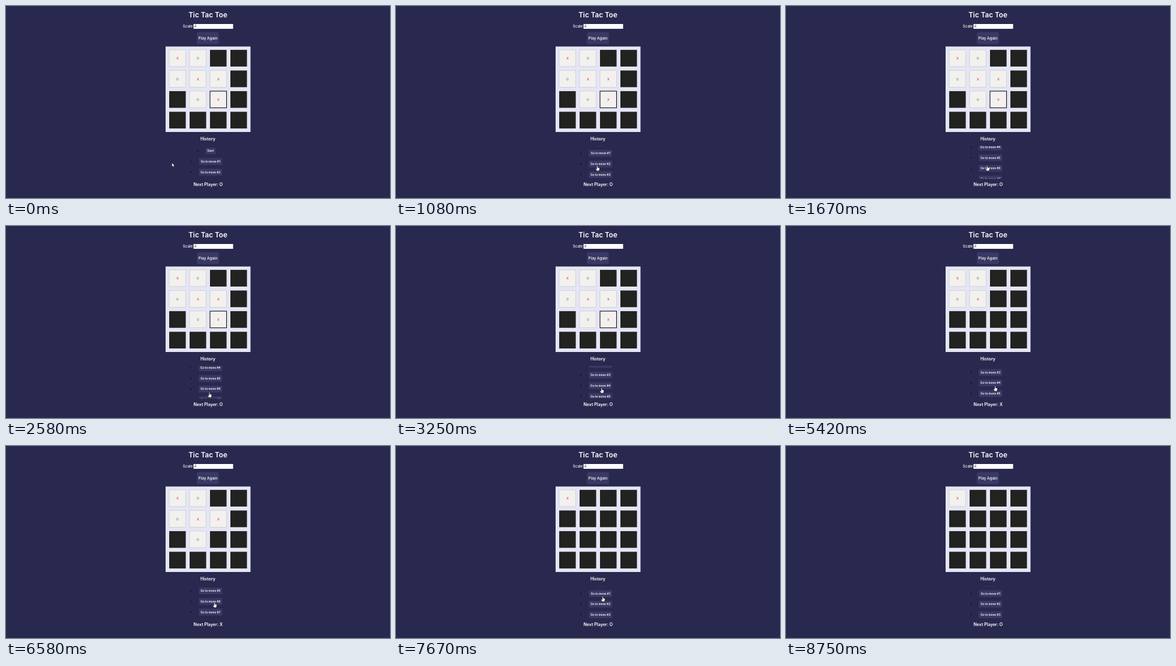
Write an HTML page that moves like this. It is 640 px wide and 320 px high and loops after 9.51 s.

```html
<!DOCTYPE html>
<html lang="en">
<head>
<meta charset="utf-8">
<title>Tic Tac Toe</title>
<style>
  html, body { margin: 0; height: 100%; overflow: hidden; background: #29294f; }
  svg { display: block; }
  text { font-family: Inter, "Open Sans", sans-serif; text-anchor: middle; fill: #fff; }
  .button { fill: #3a3864; }
  .move text { font-size: 4.75px; font-weight: 600; }
  .cell rect { fill: #222220; }
  .cell text { font-size: 5.3px; font-weight: 500; display: none; }
  .cell.on rect { fill: #f3f1ee; stroke: #c2c0c4; stroke-width: .6; }
  .cell.on text { display: inline; }
  .cell.focus rect { stroke: #000; stroke-width: 1; }
  #cursor path { fill: #fff; stroke: #111; stroke-width: .5; }
</style>
</head>
<body>
<svg width="640" height="320" viewBox="0 0 640 320">
  <clipPath id="window"><rect x="290" y="233" width="90" height="54.5"/></clipPath>
  <text x="336.5" y="19" font-size="11.7" font-weight="600">Tic Tac Toe</text>
  <text x="303" y="36" font-size="6.2" font-weight="500">Scale</text>
  <rect x="312.5" y="30" width="66" height="8" fill="#fff"/>
  <text x="315.5" y="36" font-size="5.5" style="fill:#333">4</text>
  <rect class="button" x="318" y="43.5" width="37" height="20" rx="3.5"/>
  <text x="336.5" y="56" font-size="6.4" font-weight="500">Play Again</text>
  <rect x="266" y="67.5" width="141.5" height="142.5" fill="#e4e6f6"/>
  <g id="board"></g>
  <text x="336.5" y="224.3" font-size="7.2" font-weight="600">History</text>
  <g clip-path="url(#window)"><g id="list"></g></g>
  <text id="status" x="336.8" y="300" font-size="7.1" font-weight="600"></text>
  <g id="cursor">
    <path id="arrow" d="M0 0V6.3L1.5 5L2.6 7.3L3.7 6.8L2.7 4.6H4.6Z"/>
    <path id="hand" d="M-.7 .5Q0 -.5 .7 .5V3L3.2 3.7Q4 4 3.8 5L3 8.8H-.8L-2.7 5.8Q-2.6 4.6 -.7 5.6Z"/>
  </g>
</svg>
<script>
const LOOP = 9510, STEP = 1000 / 12, PITCH = 17.7, FIRST_Y = 241.5, CENTER_X = 340.8;
const $ = id => document.getElementById(id);

// Turn on which each square was played, row by row
const turns = '14..235..67.....';

// Each gesture eases the named values to their goals; a move is shown once it ends.
// Scroll is counted in list rows.
const initial = { x: 276.5, y: 261.5, scroll: 0, move: 7 };
const gestures = [
  { from: 0, to: 920, x: 335.5, y: 266 },
  { from: 1000, to: 2040, scroll: 5 },
  { from: 2170, to: 2330, x: 339, y: 277 },
  { from: 2420, to: 2920, scroll: 3.7 },
  { from: 3000, to: 3670, scroll: 1.9, x: 345, y: 265 },
  { from: 4000, to: 4080, move: 3 },
  { from: 4500, to: 5080, scroll: 2.86, move: 4 },
  { from: 5170, to: 5420, x: 348.5, y: 266.5 },
  { from: 5670, to: 6170, scroll: 5 },
  { from: 6340, to: 6580, x: 347.5, y: 260.5, move: 6 },
  { from: 7000, to: 7500, scroll: 0.75, x: 344.5, y: 250.5 },
  { from: 7580, to: 7660, move: 1 },
  { from: 8000, to: 8330, x: 299, y: 288 },
  { from: 8500, to: 8670, x: 288, y: 307 },
];
const CURSOR_GONE = 8740;

function stateAt(t) {
  const state = { ...initial };
  for (const { from, to, move, ...goals } of gestures) {
    if (t < from) break;
    const p = Math.min(1, (t - from) / (to - from)), eased = 1 - (1 - p) ** 2;
    for (const key in goals) state[key] += (goals[key] - state[key]) * eased;
    if (move && p === 1) state.move = move;
  }
  return state;
}

const halfWidth = i => i ? 19.5 : 8.2;

[...turns].forEach((turn, i) => {
  const x = 272 + i % 4 * 34, y = 73.1 + (i >> 2) * 34.4, isX = turn % 2 === 1;
  $('board').innerHTML += `<g class="cell">
    <rect x="${x}" y="${y}" width="27.6" height="27.8"/>
    <text x="${x + 13.8}" y="${y + 16}" style="fill:${isX ? '#e0284a' : '#4f8a5a'}">${isX ? 'X' : 'O'}</text></g>`;
});
const cells = document.querySelectorAll('.cell');

for (let i = 0; i < 8; i++) {
  const y = FIRST_Y + i * PITCH, half = halfWidth(i);
  $('list').innerHTML += `<g class="move">
    <circle cx="${CENTER_X - half - 13}" cy="${y}" r="1" fill="#0c0c18"/>
    <rect class="button" x="${CENTER_X - half}" y="${y - 5.6}" width="${half * 2}" height="11.2" rx="1.2"/>
    <text x="${CENTER_X}" y="${y + 1.7}">${i ? 'Go to move #' + i : 'Start'}</text></g>`;
}

function overButton({ x, y, scroll }) {
  const row = (y - FIRST_Y) / PITCH + scroll, i = Math.round(row);
  return i >= 0 && i < 8 && y > 233 && y < 287.5 &&
    Math.abs(row - i) * PITCH < 5.6 && Math.abs(x - CENTER_X) < halfWidth(i);
}

function draw(now) {
  const t = Math.floor((now % LOOP + 4) / STEP) * STEP;
  const state = stateAt(t), pointing = overButton(state);

  cells.forEach((cell, i) => {
    const on = turns[i] <= state.move && turns[i] !== '.';
    cell.classList.toggle('on', on);
    cell.classList.toggle('focus', on && turns[i] === '7');
  });
  $('status').textContent = 'Next Player: ' + (state.move % 2 ? 'O' : 'X');
  $('list').setAttribute('transform', `translate(0 ${-state.scroll * PITCH})`);
  $('cursor').setAttribute('transform', `translate(${state.x} ${state.y})`);
  $('cursor').style.display = t < CURSOR_GONE ? '' : 'none';
  $('hand').style.display = pointing ? '' : 'none';
  $('arrow').style.display = pointing ? 'none' : '';
}

const start = performance.now();
(function tick() {
  draw(performance.now() - start);
  requestAnimationFrame(tick);
})();
</script>
</body>
</html>
```
